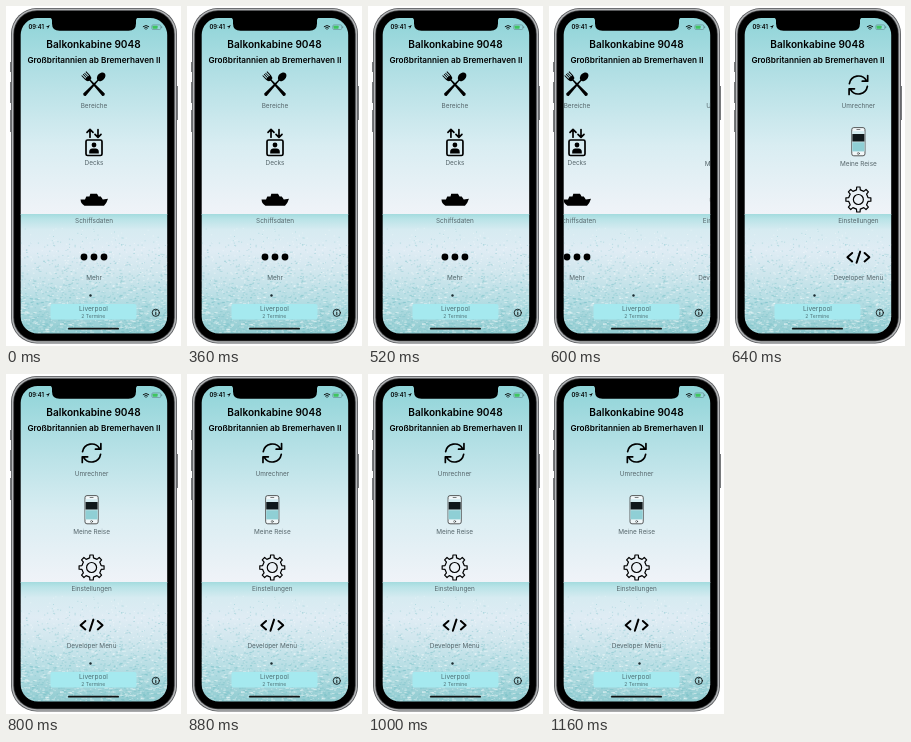
Animation of 175x340 px, one loop 1.2 s. Source, as an HTML page:

```html
<!DOCTYPE html>
<html lang="de">
<head>
<meta charset="utf-8">
<style>
  html, body { margin: 0; width: 100%; height: 100%; overflow: hidden; background: #fff; }
  svg { display: block; width: 100vw; height: 100vh; font-family: Inter, Roboto, sans-serif; }
  text { text-anchor: middle; }
  .title { font-weight: 600; }
  .label { font-size: 6.4px; fill: #56666b; }
  .line { fill: none; stroke: #000; stroke-linecap: round; stroke-linejoin: round; }
</style>
</head>
<body>
<svg viewBox="0 0 175 340">
  <defs>
    <linearGradient id="sky" x2="0" y2="1">
      <stop offset="0" stop-color="#8fd4d8"/>
      <stop offset=".3" stop-color="#b4e0e5"/>
      <stop offset=".65" stop-color="#d9edf2"/>
      <stop offset="1" stop-color="#f0f3f8"/>
    </linearGradient>
    <linearGradient id="sea" x2="0" y2="1">
      <stop offset="0" stop-color="#a3dbde"/>
      <stop offset=".04" stop-color="#b9e3e7"/>
      <stop offset=".13" stop-color="#d6ebf1"/>
      <stop offset=".3" stop-color="#dfecf4"/>
      <stop offset=".5" stop-color="#cfe6ed"/>
      <stop offset=".75" stop-color="#b2dce2"/>
      <stop offset="1" stop-color="#90cbd0"/>
    </linearGradient>
    <clipPath id="screen"><rect x="14.7" y="12" width="146.5" height="315.5" rx="17"/></clipPath>
  </defs>

  <!-- phone body -->
  <path d="M4.7 56v10M4.7 76v21M4.7 104v22M171.3 80v34" stroke="#77797b" stroke-width="1.4"/>
  <rect x="5" y="2" width="166" height="335.5" rx="26" fill="#55575a"/>
  <rect x="5.8" y="2.800" width="164.4" height="333.9" rx="25.2" fill="#b4b6b8"/>
  <rect x="7.3" y="4.3" width="161.4" height="330.9" rx="23.7" fill="#3c3d3f"/>
  <rect x="8.1" y="5.1" width="159.8" height="329.3" rx="22.9"/>

  <g clip-path="url(#screen)">
    <rect x="14" y="12" width="148" height="197" fill="url(#sky)"/>
    <rect x="14" y="208" width="148" height="120" fill="url(#sea)"/>
    <path id="glints" fill="none" stroke="#fff" stroke-opacity=".38"/>
    <path id="troughs" fill="none" stroke="#5fb3ba" stroke-opacity=".3"/>

    <g id="pages">
      <g>
        <!-- cutlery -->
        <g transform="translate(0 78.5)">
          <g transform="rotate(43)">
            <ellipse cy="-10.5" rx="3.6" ry="5"/>
            <path d="M-.7-6h1.4L1.7 14q-1.7 2.4-3.4 0z"/>
          </g>
          <g transform="rotate(-43)">
            <path d="M-3.4-15v5.5q0 3 2.7 3.8L-1.7 14q1.7 2.4 3.4 0L.7-5.7q2.7-.8 2.7-3.8V-15h-1v5H1.3v-5H.5v5H-.5v-5h-.8v5H-2.4v-5z"/>
          </g>
        </g>
        <!-- lift -->
        <g class="line" stroke-width="1.7">
          <path d="M-4 131.2V123.5M-7 126.3l3-3 3 3M4 123.5v7.7M1 128.4l3 3 3-3"/>
          <rect x="-8" y="134" width="16" height="15.5" rx="1.6"/>
        </g>
        <circle cy="139" r="2.4"/>
        <path d="M-4.8 147.5v-1.4q0-3.6 3.2-3.6h3.2q3.2 0 3.2 3.6v1.4z"/>
        <!-- ship -->
        <path d="M-13.5 193.6H-9l1.3-3.2h3.2l.8-2.6H3l1.6 2.6h2.2l2 3L14 192.8q-1.2 4.2-4 6.9H-9.5q-3.6-1.6-4-6.1z"/>
        <g><circle cx="-10" cy="251" r="3.4"/><circle cy="251" r="3.4"/><circle cx="10" cy="251" r="3.4"/></g>
        <g class="label">
          <text y="102.4">Bereiche</text><text y="159.4">Decks</text>
          <text y="216.7">Schiffsdaten</text><text y="274">Mehr</text>
        </g>
      </g>

      <g transform="translate(146)">
        <!-- refresh -->
        <g class="line" stroke-width="1.7">
          <path id="turn" d="M-9 77.6A9.2 9.2 0 0 1 8 74.6M9.3 69.6v5.600H3.9"/>
          <use href="#turn" transform="rotate(180 0 79)"/>
        </g>
        <!-- handset -->
        <rect x="-6.600" y="121.6" width="13.2" height="28.200" rx="2" fill="#f1f7f9" stroke="#333" stroke-width=".8"/>
        <path d="M-1.5 123.5h3" class="line" stroke-width=".5"/>
        <rect x="-6" y="125.2" width="12" height="20.3" fill="#d3ecf0"/>
        <rect x="-6" y="128" width="12" height="7.5" fill="#10181b"/>
        <rect x="-6" y="136.300" width="12" height="9" fill="#8fcfd5"/>
        <circle cy="147.5" r="1" class="line" stroke-width=".4"/>
        <!-- gear -->
        <path id="gear" class="line" stroke-width="1.2"/>
        <circle cy="193.5" r="5" class="line" stroke-width="1.2"/>
        <path class="line" stroke-width="2" d="M-6.2 247l-4.8 4.2 4.8 4.2M6.2 247l4.8 4.2-4.8 4.2M1.8 245.6l-3.6 11.2"/>
        <g class="label">
          <text y="102.4">Umrechner</text><text y="159.7">Meine Reise</text>
          <text y="216.7">Einstellungen</text><text y="274">Developer Menü</text>
        </g>
      </g>
    </g>

    <text class="title" x="87.5" y="41.8" font-size="10.1">Balkonkabine 9048</text>
    <text class="title" x="88" y="57" font-size="8.2">Großbritannien ab Bremerhaven II</text>
    <circle id="dot" cy="289.5" r="1.2" fill="#1c2b30"/>

    <rect x="44.5" y="298" width="86" height="15.5" rx="2" fill="#a5e9ef"/>
    <text x="87.5" y="305.2" font-size="6.6" fill="#4f7277">Liverpool</text>
    <text x="87.3" y="312.3" font-size="5.1" fill="#4f7277">2 Termine</text>
    <circle cx="149.8" cy="306.8" r="3.6" class="line" stroke-width=".8"/>
    <path d="M149.8 306.2v2.6M149.8 304.6v.1" class="line" stroke-width=".9"/>
    <rect x="62" y="321.8" width="51" height="1.8" rx=".9" fill="#111"/>

    <!-- status bar -->
    <text class="title" x="30.2" y="23.4" font-size="5.8">09:41</text>
    <path d="M43.8 19l-4.2 2h2.1v2.2z"/>
    <g class="line" stroke-width=".9"><path d="M137.2 20.6q2.8-2.4 5.6 0M138.5 22q1.5-1.2 3 0M140 23.2v.1"/></g>
    <rect x="145.8" y="18.9" width="9" height="4.6" rx="1.2" fill="none" stroke="#53777a" stroke-width=".5"/>
    <rect x="146.6" y="19.7" width="5" height="3" rx=".6" fill="#3fc45f"/>
    <path d="M155.7 20.4v1.6" stroke="#53777a" stroke-width=".7"/>
    <path d="M43 11.500q3 .3 3 3v3q0 7.300 7.500 7.300h69q7.500 0 7.500-7.300v-3q0-2.700 3-3z"/>
  </g>
</svg>

<script>
const $ = id => document.getElementById(id);
const LOOP = 1200, STEP = 40;
const PAGE = 146;
// The finger drags the page, then a critically damped spring takes over
const TOUCH = 500, RELEASE = 600, DRAG = 60;
const DAMPING = 0.0115, PULL = 0.551;

let seed = 7;
const random = () => (seed = seed * 16807 % 2147483647) / 2147483647;

// Ripples grow longer and denser towards the viewer
function ripples(count) {
  let d = '';
  for (let i = 0; i < count; i++) {
    const depth = random() ** .6;
    const length = .8 + depth * 3.5 * random();
    d += `M${(13 + random() * 148).toFixed(1)} ${(222 + depth * 105).toFixed(1)}h${length.toFixed(1)}`;
  }
  return d;
}

function gearPath(cy, teeth, inner, outer) {
  const points = [];
  for (let i = 0; i < teeth; i++) {
    for (const [offset, r] of [[-.25, inner], [-.17, outer], [.17, outer], [.25, inner]]) {
      const a = (i + offset) / teeth * 2 * Math.PI;
      points.push(`${(r * Math.sin(a)).toFixed(2)} ${(cy - r * Math.cos(a)).toFixed(2)}`);
    }
  }
  return `M${points.join('L')}Z`;
}

function swipeAt(t) {
  if (t < TOUCH) return 0;
  if (t < RELEASE) return DRAG * ((t - TOUCH) / (RELEASE - TOUCH)) ** 2.5;
  const u = t - RELEASE;
  return PAGE - (PAGE - DRAG - PULL * u) * Math.exp(-DAMPING * u);
}

function draw(now) {
  const t = Math.floor(now % LOOP / STEP) * STEP;
  $('pages').setAttribute('transform', `translate(${(88 - swipeAt(t)).toFixed(2)})`);
  $('dot').setAttribute('cx', t < 1080 ? 84.5 : 90.5);
}

$('glints').setAttribute('d', ripples(700));
$('troughs').setAttribute('d', ripples(800));
$('gear').setAttribute('d', gearPath(193.5, 8, 9.8, 12.6));

const start = performance.now();
function tick() {
  draw(performance.now() - start);
  requestAnimationFrame(tick);
}
tick();
</script>
</body>
</html>
```
